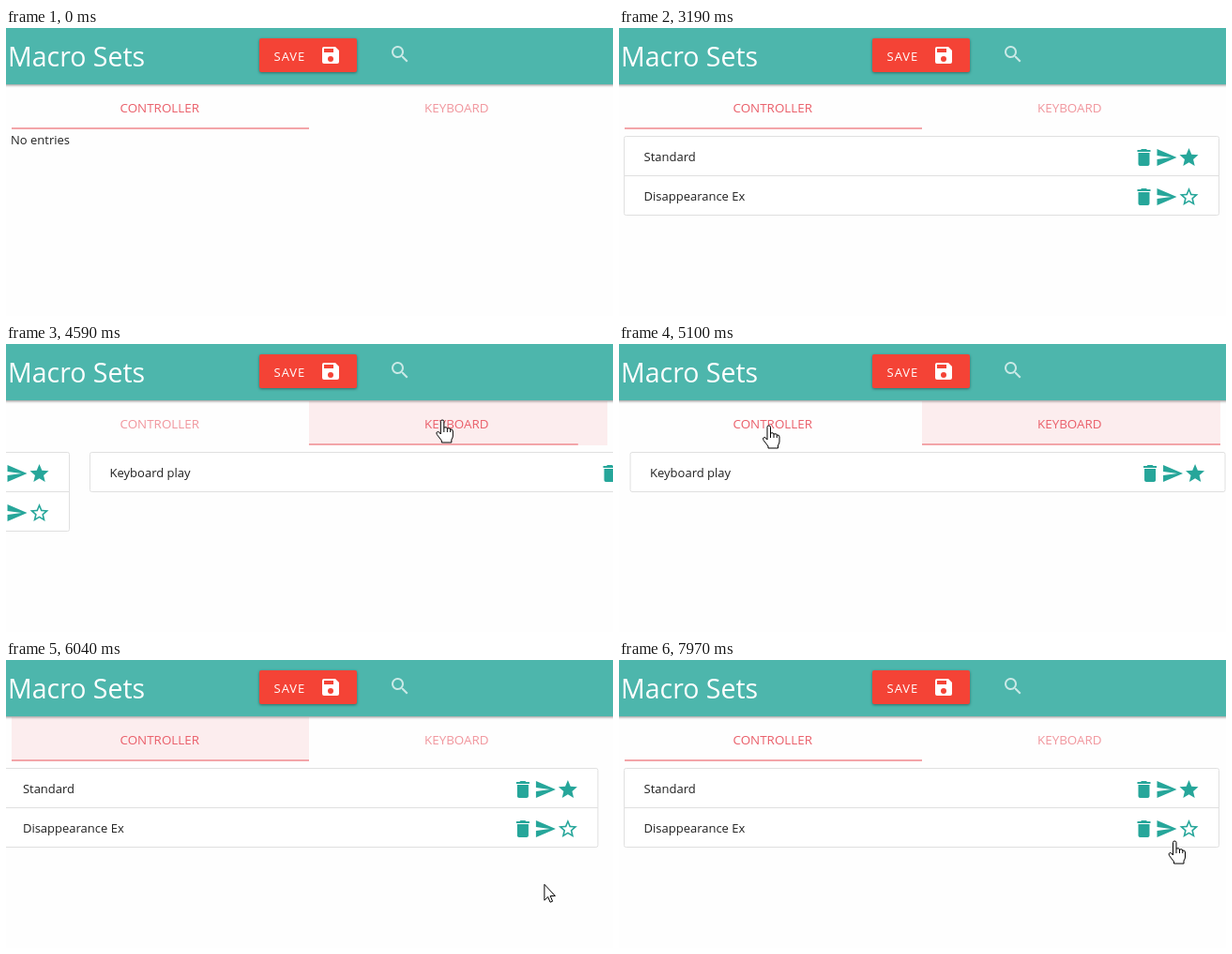
These frames come from a looping animation (647x307 px, 8 s). An HTML page:

```html
<!DOCTYPE html>
<html lang="en">
<head>
<meta charset="utf-8">
<title>Macro Sets</title>
<style>
  html, body { margin: 0; width: 100%; height: 100%; overflow: hidden; background: #fefefe; }
  svg { display: block; }
  text { font: 13px "Open Sans", "Noto Sans", sans-serif; fill: #212121; }
  .tab { font-size: 13.4px; fill: #ea5f6a; }
  .focus { fill: #f6b2b5; }
  .bar { fill: #4db6ac; filter: drop-shadow(0 1px 1.5px rgba(0,0,0,.45)); }
  .button { fill: #f44336; filter: drop-shadow(0 1px 1.5px rgba(0,0,0,.4)); }
  .bar-text text { fill: #fff; }
  .icon { fill: #26a69a; }
  .frame { fill: #fff; stroke: #e0e0e0; }
  .cursor { fill: #fff; stroke: #000; stroke-linejoin: round; }
</style>
</head>
<body>
<svg width="647" height="307" viewBox="0 0 647 307">
  <defs>
    <path id="trash" d="M6 19c0 1.1.9 2 2 2h8c1.1 0 2-.9 2-2V7H6v12zM19 4h-3.500l-1-1h-5l-1 1H5v2h14V4z"/>
    <path id="send" d="M2 21L23 12 2 3v7l15 2-15 2z"/>
    <path id="star" d="M12 17.300L18.200 21l-1.640-7.030L22 9.240l-7.190-.61L12 2 9.190 8.630 2 9.240l5.460 4.730L5.820 21z"/>
    <path id="hollow" fill-rule="evenodd" d="M12 17.300L18.200 21l-1.640-7.030L22 9.240l-7.190-.61L12 2 9.190 8.630 2 9.240l5.460 4.730L5.820 21zM12 15.400l-3.760 2.270 1-4.280-3.320-2.880 4.380-.38L12 6.100l1.710 4.040 4.380.38-3.320 2.880 1 4.280z"/>
  </defs>

  <rect class="focus" id="focus0" x="6" y="61" width="317" height="47"/>
  <rect class="focus" id="focus1" x="323" y="61" width="318" height="47"/>
  <text class="tab" id="tab0" x="121.500" y="90">CONTROLLER</text>
  <text class="tab" id="tab1" x="446" y="90">KEYBOARD</text>
  <rect id="line" y="106" height="2" fill="#f3a5a9"/>

  <text id="empty" x="5" y="124">No entries</text>
  <g id="lists"></g>

  <rect class="bar" x="-5" y="-5" width="657" height="65"/>
  <rect class="button" x="270" y="11" width="104" height="36" rx="2"/>
  <g class="bar-text">
    <text x="2" y="41" style="font-size:28.500px">Macro Sets</text>
    <text x="285.500" y="35" letter-spacing="1">SAVE</text>
  </g>
  <path transform="translate(334 17)" fill="#fff" fill-rule="evenodd" d="M17 3H5a2 2 0 0 0-2 2v14a2 2 0 0 0 2 2h14a2 2 0 0 0 2-2V7zM12 19a3 3 0 1 1 0-6 3 3 0 0 1 0 6zM15 9H5V5h10z"/>
  <path transform="translate(408 16)" fill="#fff" opacity=".7" fill-rule="evenodd" d="M15.500 14h-.8l-.27-.27a6.500 6.500 0 1 0-.7.7l.27.28v.79l5 5 1.490-1.500zM9.500 14a4.500 4.500 0 1 1 0-9 4.500 4.500 0 0 1 0 9z"/>

  <g id="pointer">
    <circle id="press" r="13" fill="#fbf556" opacity=".8"/>
    <path class="cursor" id="arrow" d="M.5 0V17L4.300 13.300 6.700 19 9.200 18 6.800 12.300H12Z"/>
    <path class="cursor" id="hand" d="M-2 15V1.500Q-2 0-.3 0 1.500 0 1.500 1.500V8Q5 7 5 9 8.300 8 8.300 10 11 9.500 11 12V17Q11 19 9.500 21V24H-1V22L-6 15.500Q-7.500 13-5 12.500-3.500 12.500-2 15ZM1.500 8V13M5 9V13M8.300 10V13"/>
  </g>
</svg>
<script>
const LOOP = 8000, PAGE = 656, TAU = 200;
const LOADED = 3190, TO_KEYS = 4180, TO_PAD = 5174, BLUR = 7150;
const $ = id => document.getElementById(id);
const clamp = v => Math.max(0, Math.min(1, v));
const ramp = (t, start, length = 280) => clamp((t - start) / length);
const show = (id, on) => $(id).style.display = on ? "" : "none";

// Cursor waypoints: time, x, y
const visits = [
  [[1260, 622, 108], [1400, 605, 104], [1620, 545, 228], [1790, 560, 261]],
  [[3760, 560, 259], [4060, 466, 81], [4590, 466, 81], [5050, 160, 87],
   [5200, 160, 87], [5630, 500, 239], [5850, 545, 249], [6220, 600, 230],
   [6480, 605, 187], [6600, 605, 187], [6750, 584, 181], [7820, 584, 181],
   [7970, 592.5, 193], [8000, 592.5, 193]]
];
const presses = [[4110, 4220], [5130, 5220], [7110, 7300]];

function list(x, names) {
  const rows = names.map((name, i) => {
    const y = 42 * i;
    const icons = ["trash", "send", i ? "hollow" : "star"].map((id, k) =>
      `<use class="icon" href="#${id}" x="${547.5 + 24 * k}" y="${126 + y}"/>`).join("");
    const rule = i ? `<path class="frame" d="M5.5 ${115.5 + y}h634"/>` : "";
    return `${rule}<text x="26.5" y="${142 + y}">${name}</text>${icons}`;
  }).join("");
  return `<g transform="translate(${x})"><rect class="frame" x="5.5" y="115.5" width="634" height="${42 * names.length}" rx="2"/>${rows}</g>`;
}
$("lists").innerHTML = list(0, ["Standard", "Disappearance Ex"]) + list(PAGE, ["Keyboard play"]);

// Exponential settle that snaps once within two pixels
function settle(t, start) {
  if (t <= start) return 0;
  const rest = Math.exp((start - t) / TAU);
  return rest * PAGE > 2 ? 1 - rest : 1;
}

const easeOut = p => 1 - (1 - p) ** 2;
const edge = (t, start) => easeOut(ramp(t, start, 300));

function drawTabs(t) {
  const right = TO_KEYS + 115, left = TO_PAD + 115;
  const x0 = 6 + 317 * (edge(t, right) - edge(t, left + 90));
  const x1 = 323 + 318 * (edge(t, right + 90) - edge(t, left));
  $("line").setAttribute("x", x0);
  $("line").setAttribute("width", Math.max(0, x1 - x0));
  $("focus0").style.opacity = .22 * (ramp(t, TO_PAD) - ramp(t, BLUR));
  $("focus1").style.opacity = .22 * (ramp(t, TO_KEYS) - ramp(t, TO_PAD));
  $("tab0").style.opacity = 1 - .35 * (ramp(t, TO_KEYS) - ramp(t, 4820));
  $("tab1").style.opacity = .65 + .35 * (ramp(t, 3900) - ramp(t, TO_PAD));
}

function drawPointer(t) {
  const path = visits.find(v => t >= v[0][0] && t < v[v.length - 1][0]);
  show("pointer", path);
  if (!path) return;
  const i = path.findIndex(p => p[0] > t);
  const [ta, xa, ya] = path[i - 1], [tb, xb, yb] = path[i];
  const p = (t - ta) / (tb - ta);
  const x = xa + (xb - xa) * p, y = ya + (yb - ya) * p;
  const overLink = y < 108 || (x > 550 && y < 200 && t > LOADED);
  $("pointer").setAttribute("transform", `translate(${x} ${y})`);
  show("hand", overLink);
  show("arrow", !overLink);
  show("press", presses.some(([a, b]) => t >= a && t < b));
}

function draw(now) {
  const t = now % LOOP;
  const page = t < TO_PAD ? settle(t, TO_KEYS) : 1 - settle(t, TO_PAD);
  show("empty", t < LOADED);
  show("lists", t >= LOADED);
  $("lists").setAttribute("transform", `translate(${-PAGE * page})`);
  drawTabs(t);
  drawPointer(t);
}

const began = performance.now();
function tick() {
  draw(performance.now() - began);
  requestAnimationFrame(tick);
}
tick();
</script>
</body>
</html>
```
